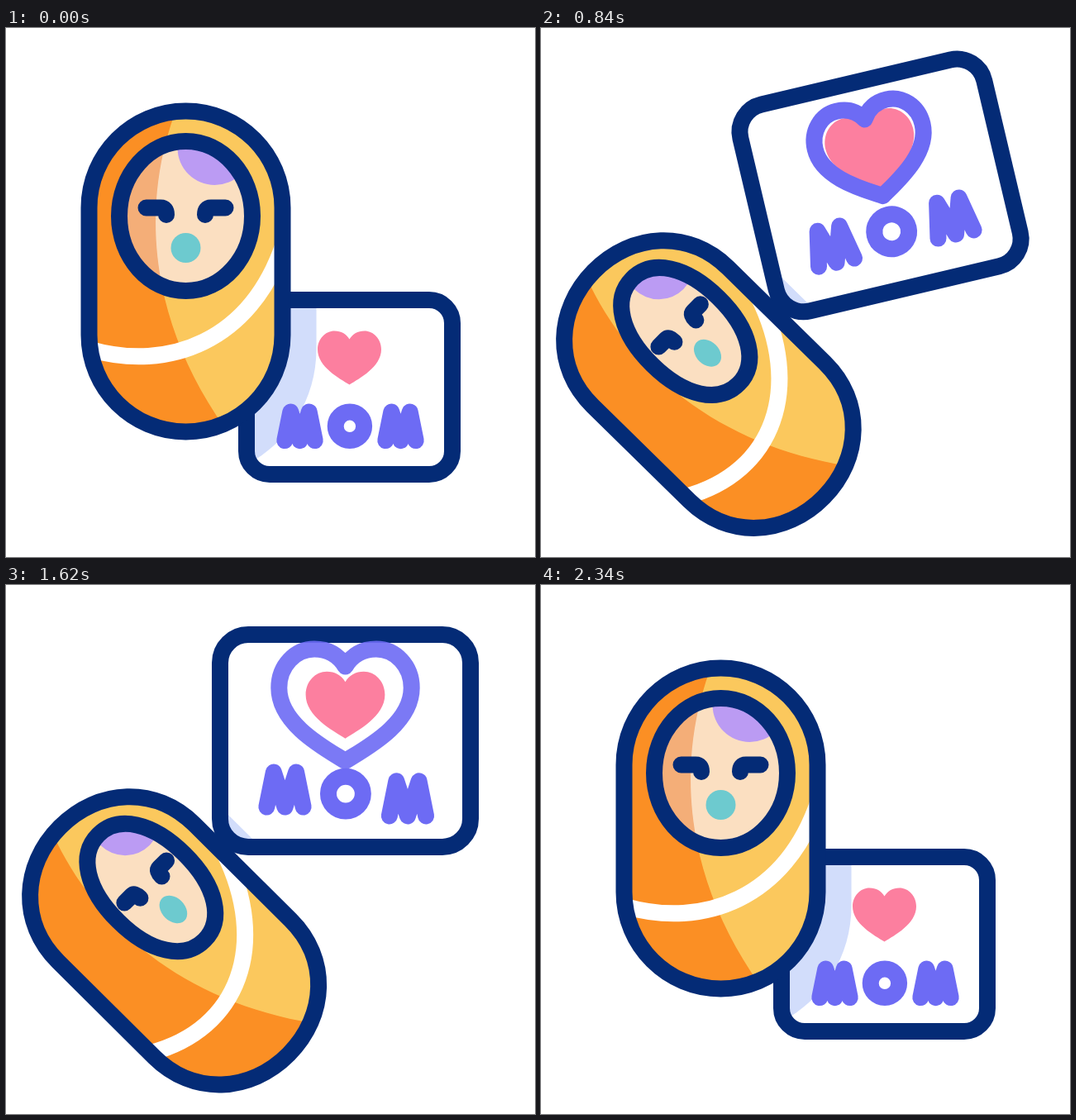
These frames come from a looping animation (640x640 px, 2.8 s). An HTML page with a canvas:

```html
<!DOCTYPE html>
<html lang="en">
<head>
<meta charset="utf-8">
<title>Baby with a card</title>
<style>
  html, body { margin: 0; width: 100%; height: 100%; overflow: hidden; background: #fff; }
  canvas { display: block; width: 640px; height: 640px; }
</style>
</head>
<body>
<canvas id="stage"></canvas>
<script>
const LOOP = 2800;
const NAVY = '#042b76', PURPLE = '#6d6bf4', PINK = '#fc7f9f', ORANGE = '#fb8f24',
  YELLOW = '#fbc85d', SKIN = '#fbdfc1', SKIN_SHADE = '#f4ae78', HAIR = '#bb9bf3',
  TEAL = '#6dcacf', SHADOW = '#d2ddfb';
const PULSES = [700, 1240], PULSE_TIME = 530, HOP_DELAY = 80;

const canvas = document.getElementById('stage');
const ctx = canvas.getContext('2d');
const dpr = window.devicePixelRatio || 1;
canvas.width = canvas.height = 640 * dpr;

const mix = (a, b, k) => a + (b - a) * k;
const clamp = v => Math.min(1, Math.max(0, v));

// 0 to 1 between two times, slow at both ends.
function ease(t, from, to) {
  const p = clamp((t - from) / (to - from));
  return p * p * (3 - 2 * p);
}

// Up, a pause, and back down.
const hold = (t, a, b, c, d) => ease(t, a, b) - ease(t, c, d);

// Up and down in turn, changing direction at each time.
function swing(t, ...times) {
  let v = 0;
  for (let i = 1; i < times.length; i++) v += (i % 2 ? 1 : -1) * ease(t, times[i - 1], times[i]);
  return v;
}

function babyPose(t) {
  const turn = hold(t, 120, 600, 1760, 2340);
  const lean = hold(t, 120, 600, 1800, 2340);
  const rock = swing(t, 600, 900, 1300, 1740);
  const arc = Math.sin(Math.PI * ease(t, 1760, 2340));
  return {
    turn,
    x: 217.5 - 6.5 * turn - 9 * rock * turn - 10 * arc,
    y: 294.5 + 128 * turn + 9.5 * rock * turn,
    tilt: -lean * (42 + 3.9 * rock),
    mouth: 18 + 6.5 * (turn * (1 - rock) + 1.5 * arc)
  };
}

function cardPose(t) {
  const lift = hold(t, 120, 880, 1670, 2320);
  return {
    x: 415.5 - 5 * lift,
    y: 434.5 - 246 * lift,
    scale: 1 + 0.217 * hold(t, 120, 800, 1660, 2260),
    tilt: -13.3 * hold(t, 120, 760, 1000, 1360),
    heart: 1 + 0.24 * hold(t, 120, 700, 1920, 2320) +
      0.32 * swing(t, 120, 700, 1000, 1260, 1600, 1920, 2320)
  };
}

const hop = t => 15.5 * swing(t, 1110, 1370, 1680) - 9 * swing(t, 880, 1110, 1370);

function fill(path, color) {
  ctx.fillStyle = color;
  ctx.fill(path);
}

function stroke(path, color) {
  ctx.strokeStyle = color;
  ctx.stroke(path);
}

function within(path, draw) {
  ctx.save();
  ctx.clip(path);
  draw();
  ctx.restore();
}

function placed({ x, y, tilt }, draw) {
  ctx.save();
  ctx.translate(x, y);
  ctx.rotate(tilt * Math.PI / 180);
  draw();
  ctx.restore();
}

// Half width w, straight sides of half length d, caps of height cap.
function capsule(x, y, w, d, cap, hx, hy) {
  const p = new Path2D();
  for (const s of [1, -1]) {
    const side = y - s * d, end = y - s * (d + cap);
    p.lineTo(x - s * w, side);
    p.bezierCurveTo(x - s * w, side - s * hy, x - s * hx, end, x, end);
    p.bezierCurveTo(x + s * hx, end, x + s * w, side - s * hy, x + s * w, side);
  }
  p.closePath();
  return p;
}

function oval(x, y, rx, ry = rx) {
  const p = new Path2D();
  p.ellipse(x, y, rx, ry, 0, 0, Math.PI * 2);
  return p;
}

function heartPath(y, s) {
  const p = new Path2D();
  for (const side of [-1, 1]) {
    const curve = (...n) => p.bezierCurveTo(...n.map((v, i) => i % 2 ? y + v * s : v * s * side));
    p.moveTo(0, y + 32.5 * s);
    curve(12, 25, 38.5, 11, 38.5, -10);
    curve(38.5, -23, 29, -32.5, 18, -32.5);
    curve(10, -32.5, 4, -29, 0, -22.5);
  }
  return p;
}

function letterM(x, y, s) {
  const p = new Path2D();
  [-18.2, -11.2, 0, 11.2, 18.2].forEach((dx, i) =>
    p.lineTo(x + dx * s, y + (i % 2 ? -17.3 : 17.3) * s));
  return p;
}

function drawHeart(t, y, scale) {
  fill(heartPath(y, scale), PINK);
  for (const start of PULSES) {
    const p = t - start;
    if (p <= 0 || p >= PULSE_TIME) continue;
    ctx.globalAlpha = clamp(p / 40) * clamp((PULSE_TIME - p) / 165);
    stroke(heartPath(y, 1.43 + 0.0024 * p - 0.0000018 * p * p), PURPLE);
    ctx.globalAlpha = 1;
  }
}

function drawCard(t, card, baby) {
  const s = card.scale, w = 249 * s, h = 211 * s;
  const frame = new Path2D();
  frame.roundRect(-w / 2, -h / 2, w, h, 28 * s);

  placed(card, () => {
    fill(frame, '#fff');
    within(frame, () => {
      // The shadow follows the baby, so step back to stage space.
      ctx.rotate(-card.tilt * Math.PI / 180);
      ctx.translate(-card.x, -card.y);
      placed(baby, () => {
        const r = 158 - 4 * baby.turn;
        fill(capsule(0, 0, r, 94, r, r * 0.552, r * 0.552), SHADOW);
      });
    });
    stroke(frame, NAVY);
    drawHeart(t, -35.5 * s, card.heart);

    const line = i => 47.3 * s + hop(t - i * HOP_DELAY);
    stroke(letterM(-60 * s, line(0), s), PURPLE);
    stroke(oval(0.4, line(1), 17.2 * s), PURPLE);
    stroke(letterM(62 * s, line(2), s), PURPLE);
  });
}

function drawFace({ turn: m, mouth }, shade) {
  const x = 26 * m, y = -67 + 2 * m;
  const w = mix(80.5, 57, m), h = 90.5, k = mix(0.552, 0.6, m);
  const face = capsule(x, y, w, 0, h, w * k, h * k);

  fill(face, SKIN);
  within(face, () => {
    fill(shade, SKIN_SHADE);
    fill(oval(x + 35, -149.5 + 5 * m, 45 - 3 * m), HAIR);
  });
  stroke(face, NAVY);

  for (const side of [-1, 1]) {
    const outer = x + side * mix(48, 36, m), inner = x + side * mix(23.5, 18.5, m);
    const brow = -77 + 2 * m;
    const eye = new Path2D();
    eye.moveTo(outer, brow);
    eye.lineTo(mix(outer, inner, 0.72), brow);
    eye.quadraticCurveTo(inner, brow, inner, -68.5 + 3 * m);
    stroke(eye, NAVY);
  }
  fill(oval(x, -28.5 + m, 18 - 4 * m, mouth), TEAL);
}

function drawBaby(baby) {
  const m = baby.turn, handle = mix(64.6, 66, m);
  const body = capsule(0, 0, 117, mix(77, 82, m), mix(117, 113, m), handle, handle);

  const shade = new Path2D();
  shade.moveTo(-12, -195);
  shade.bezierCurveTo(-55, -80, -45, 60, 48, 190);
  shade.lineTo(-160, 220);
  shade.lineTo(-160, -220);
  shade.closePath();

  const band = new Path2D();
  band.moveTo(-117, 94 - 19 * m);
  band.bezierCurveTo(-20, 122 + 10 * m, 78, 84, 118, -32);

  placed(baby, () => {
    fill(body, YELLOW);
    within(body, () => {
      fill(shade, ORANGE);
      stroke(band, '#fff');
    });
    drawFace(baby, shade);
    stroke(body, NAVY);
  });
}

function draw(t) {
  ctx.setTransform(dpr, 0, 0, dpr, 0, 0);
  ctx.fillStyle = '#fff';
  ctx.fillRect(0, 0, 640, 640);
  ctx.lineWidth = 20;
  ctx.lineCap = ctx.lineJoin = 'round';

  const baby = babyPose(t);
  drawCard(t, cardPose(t), baby);
  drawBaby(baby);
}

const begin = performance.now();
function tick() {
  draw((performance.now() - begin) % LOOP);
  requestAnimationFrame(tick);
}
tick();
</script>
</body>
</html>
```
